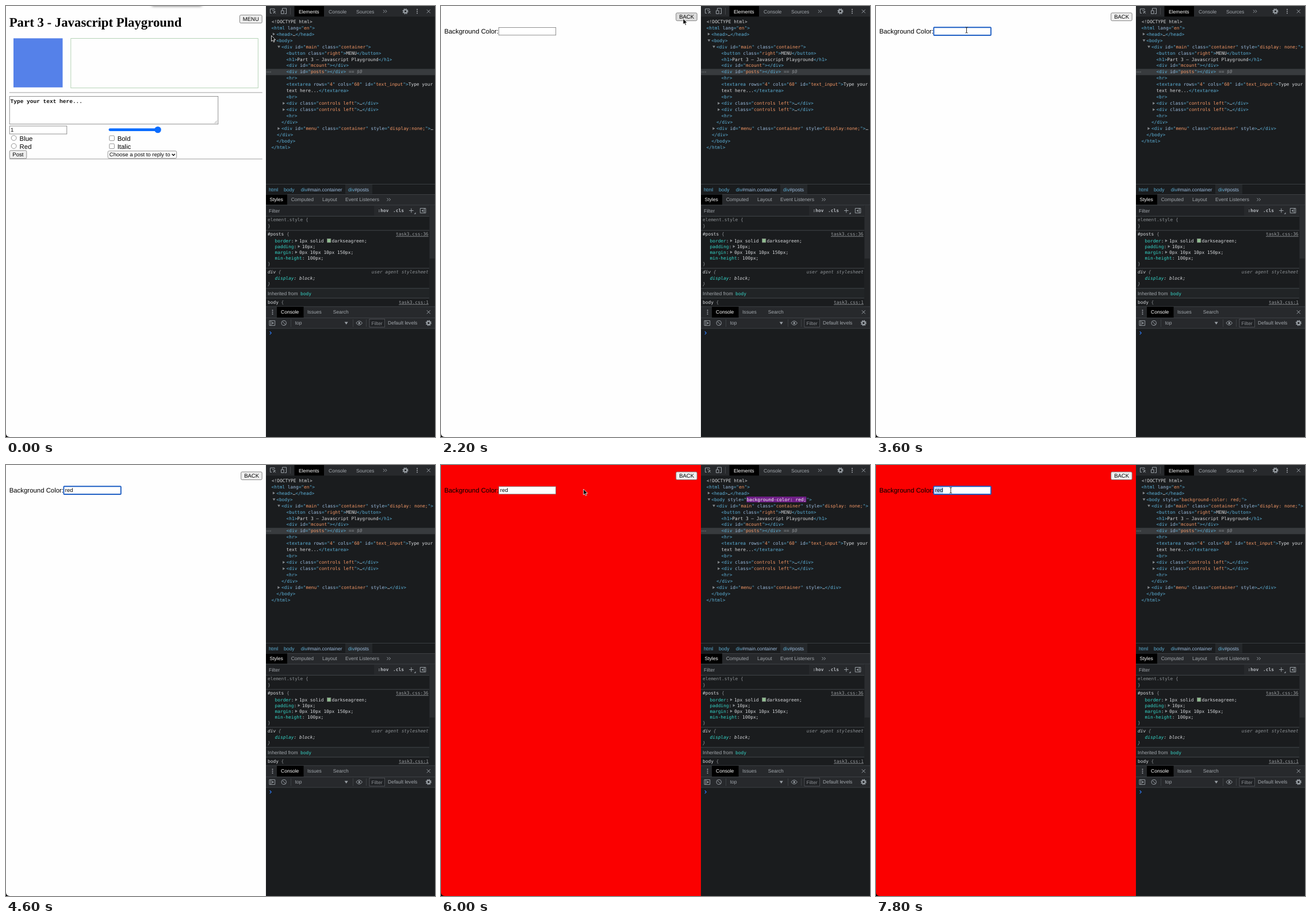
Write an HTML page that moves like this. It is 746 by 751 pixels and loops after 8 s.

```html
<!DOCTYPE html>
<html lang="en">
<head>
<meta charset="utf-8">
<style>
html, body { margin: 0; width: 100%; height: 100%; overflow: hidden; background: #fefefe; }
svg { display: block; }
text { text-rendering: geometricPrecision; white-space: pre; }
.page { font: 11.4px "Liberation Sans", Arial, sans-serif; fill: #000; }
.form { font: 9.5px "Liberation Sans", Arial, sans-serif; fill: #000; }
.title { font: bold 22.8px "Liberation Serif", Times, serif; }
.area { font: bold 9.5px "Liberation Mono", monospace; fill: #111; }
.ui { font: 8.55px "Liberation Sans", Arial, sans-serif; fill: #a2a7ac; }
.mono { font: 7.83px "DejaVu Sans Mono", monospace; fill: #d5d7da; }
.on { fill: #fff; }
.tag { fill: #5db0d7; }
.attr { fill: #9bbbdc; }
.val { fill: #f29766; }
.prop { fill: #35d4c7; }
.dim { fill: #8c9094; }
.it { font-style: italic; }
.bold { font-weight: bold; fill: #b6babf; }
.link { fill: #9a9da0; text-decoration: underline; }
.icon { fill: none; stroke: #9aa0a6; stroke-width: 1; }
</style>
</head>
<body>
<svg id="stage" width="746" height="751" viewBox="0 0 746 751"></svg>
<script>
const BG = '#1a1c1e', BAR = '#27292c', LINE = '#43464a', CHAR = 4.713;

const rect = (x, y, w, h, fill, extra = '') =>
  `<rect x="${x}" y="${y}" width="${w}" height="${h}" fill="${fill}" ${extra}/>`;
const text = (x, y, cls, body) => `<text x="${x}" y="${y}" class="${cls}">${body}</text>`;
const span = (cls, body) => `<tspan class="${cls}">${body}</tspan>`;
const path = (d, extra = 'class="icon"') => `<path d="${d}" ${extra}/>`;
const circle = (x, y, r, extra) => `<circle cx="${x}" cy="${y}" r="${r}" ${extra}/>`;
const group = (id, body) => `<g id="${id}">${body}</g>`;
const box = (x, y, w, h, fill = '#fff', r = 0) =>
  rect(x, y, w, h, fill, `stroke="#767676" stroke-width=".8" rx="${r}"`);
const rule = y => rect(452, y, 284, 1, LINE);
const strip = (y, h, fill) => rect(452, y, 294, h, fill);

// Colours markup the way the element inspector does.
const markup = line => line.split(/(<[^>]*>)/).map(part => {
  if (part[0] !== '<') return part;
  const inner = part.replace('<', '&lt;').replace(/( [\w-]+)(?:(=")([^"]*))?/g,
    (_, name, eq, value) => span('attr', name) + (eq ? eq + span('val', value) : ''));
  return span('tag', inner);
}).join('');

const rowY = n => 29.7 + n * 10.97;
const row = (n, x, line, after = '') => text(x, rowY(n), 'mono', markup(line) + after);
const arrow = (x, y, open) =>
  path(open ? `M${x - 2.4} ${y - 1.7}h4.8l-2.4 4z` : `M${x - 1.6} ${y - 2.4}v4.8l4-2.4z`, 'fill="#84888c"');
const rowArrow = (n, x, open) => arrow(x, rowY(n) - 2.7, open);
const flash = (id, n, x, chars, label) => group(id,
  rect(x, rowY(n) - 7.6, chars * CHAR, 10, '#6f1f87') + text(x, rowY(n), 'mono on', label));

const gear = (x, y) => circle(x, y, 2.8, 'fill="none" stroke="#9aa0a6" stroke-width="2"') +
  circle(x, y, 4.4, 'fill="none" stroke="#9aa0a6" stroke-width="1.4" stroke-dasharray="1.8 1.655"');
const cross = (x, y) => path(`M${x - 3} ${y - 3}l6 6m0 -6l-6 6`);
const dots = (x, y) => [-3.3, 0, 3.3].map(d => circle(x, y + d, 1, 'fill="#a4a8ad"')).join('');
const chevrons = (x, y) => path(`M${x - 3} ${y - 2.5}l2.5 2.5l-2.5 2.5m3.5 -5l2.5 2.5l-2.5 2.5`);

function mainPage() {
  return `<g filter="url(#blur)">${rect(254, -9, 86, 9, '#000', 'opacity=".6"')}</g>` +
    text(5.7, 35.6, 'title', 'Part 3 - Javascript Playground') +
    `<rect id="menuButton" x="406.4" y="15.8" width="38.8" height="13.9" rx="2" stroke="#767676" stroke-width=".9"/>` +
    text(411.8, 26, 'form', 'MENU') +
    rect(13, 56.3, 85.5, 85.5, '#5581e9') +
    rect(112.8, 56.6, 325.5, 86.2, 'none', 'stroke="#a3c9a5" stroke-width=".8"') +
    [150.5, 266].map(y => rect(5.7, y, 440, .8, '#858585') + rect(5.7, y + .8, 440, .5, '#dcdcdc')).join('') +
    box(6.2, 157.4, 362.6, 48.4) + text(7.6, 169, 'area', 'Type your text here...') +
    path('M362.5 204.2l4.5 -4.5m-2 4.5l2 -2', 'stroke="#777" stroke-width=".7"') +
    box(6.2, 209.1, 99.6, 13.9) + text(8, 219.4, 'form', '1') +
    rect(178.5, 213.3, 90, 4.6, '#0a6cff', 'rx="2.3"') + circle(264, 215.6, 5.7, 'fill="#0a6cff"') +
    [['Blue', 'Bold', 230], ['Red', 'Italic', 244]].map(([left, right, y]) =>
      circle(13.6, y, 4.4, 'fill="#fff" stroke="#767676" stroke-width=".8"') +
      text(23.6, y + 4.6, 'page', left) +
      box(179.8, y - 4, 8.6, 8.6, '#fff', 1.5) + text(193.7, y + 5, 'page', right)).join('') +
    box(6.2, 251.8, 29.6, 14, '#efefef', 2) + text(11.3, 262.2, 'form', 'Post') +
    box(177.2, 252.7, 119.4, 12.6, '#fff', 2) +
    text(179.8, 262.3, 'form', 'Choose a post to reply to') +
    path('M288.6 257.8l2.6 2.6l2.6 -2.6', 'fill="none" stroke="#000" stroke-width="1.4"');
}

function menuPage() {
  return `<rect id="backButton" x="408.7" y="12" width="36.5" height="13.7" rx="2" stroke="#767676" stroke-width=".9"/>` +
    text(414.2, 22.2, 'form', 'BACK') + text(5.7, 47.6, 'page', 'Background Color:') +
    box(100.5, 37.4, 99.2, 13.4) +
    rect(100.4, 37.3, 99.4, 13.7, 'none', 'id="focus" stroke="#1f5fc4" stroke-width="1.9" rx="1"') +
    rect(102.8, 39, 14, 10.4, '#b3d5fb', 'id="selection"') +
    `<text id="typed" x="102.8" y="47.2" class="form"></text>`;
}

function elementsPanel() {
  const tabs = [['Elements', 509, 'on'], ['Console', 561, ''], ['Sources', 609, '']];
  return strip(0, 751, BG) +
    strip(0, 18.5, BAR) + rect(501.5, 0, 51.5, 18.5, '#000') + rect(494, 3, 1, 12, LINE) +
    path('M467 7v-2h-7.5v7.5h2.5M463 7.5l5.5 2.2l-2.2 .8l2.6 2.7m-2.6 -2.7l-1.2 2.4z') +
    path('M480.5 8v-4h7v9.5h-3M478.5 8h4.5v5.5h-4.5z') +
    tabs.map(([label, x, cls]) => text(x, 12.6, 'ui ' + cls, label)).join('') +
    chevrons(659, 9.3) + gear(694.5, 9.3) + dots(715, 9.3) + cross(734.8, 9.3) +
    strip(rowY(8) - 7.9, 10.9, '#383b3e') +
    [454, 457, 460].map(x => circle(x, rowY(8) - 2.4, .7, 'fill="#8c9094"')).join('') +
    row(0, 462, '', '&lt;!DOCTYPE html&gt;') + row(1, 461.5, '<html lang="en">') +
    rowArrow(2, 465.5) + row(2, 470.2, '<head>…</head>') +
    rowArrow(3, 466, true) + rowArrow(4, 474.5, true) +
    row(5, 487.5, '<button class="right">MENU</button>') +
    row(6, 487.5, '<h1>Part 3 – Javascript Playground</h1>') +
    row(7, 487.5, '<div id="mcount"></div>') +
    row(8, 487.5, '<div id="posts"></div>', span('dim it', ' == $0')) +
    row(9, 487.5, '<hr>') +
    row(10, 487.5, '<textarea rows="4" cols="60" id="text_input">Type your') +
    row(11, 487.5, 'text here...</textarea>') + row(12, 487.5, '<br>') +
    [13, 14].map(n => rowArrow(n, 482.8) + row(n, 487.5, '<div class="controls left">…</div>')).join('') +
    row(15, 487.5, '<hr>') + row(16, 479, '</div>') + rowArrow(17, 474) +
    group('domBefore',
      row(4, 479, '<div id="main" class="container">') +
      row(17, 479, '<div id="menu" class="container" style="display:none;">…') +
      row(18, 471, '</div>') + row(19, 470.2, '</body>') + row(20, 461.5, '</html>')) +
    group('domAfter',
      row(4, 479, '<div id="main" class="container" style="display: none;">') +
      row(17, 479, '<div id="menu" class="container" style>…</div>') +
      row(18, 470.2, '</body>') + row(19, 461.5, '</html>')) +
    group('bodyPlain', row(3, 470.2, '<body>')) +
    group('bodyRed', row(3, 470.2, '<body style="background-color: red;">')) +
    group('menuFlash', flash('flashMain', 4, 479 + 40 * CHAR, 14, 'display: none;') +
      flash('flashMenu', 17, 479 + 33 * CHAR, 5, 'style')) +
    flash('bodyFlash', 3, 470.2 + 13 * CHAR, 22, 'background-color: red;');
}

function stylesPanel() {
  const crumb = (x, tag, rest = '') => text(x, 322.7, 'ui tag', tag + span('attr', rest));
  const decl = (y, name, value, expands) => {
    const after = 467.5 + (name.length + 1) * CHAR;
    return text(467.5, y, 'mono', span('prop', name) + ':') + (expands ? arrow(after + 4, y - 2.7) : '') +
      text(after + (expands ? 9.5 : CHAR), y, 'mono', value);
  };
  const tabs = [['Styles', 458.5, 'on'], ['Computed', 495.7, ''], ['Layout', 550, ''], ['Event Listeners', 590, '']];
  return strip(328, 38, BAR) + strip(310, .8, LINE) +
    rect(590, 311, 47, 16.5, '#25282b') + crumb(457, 'html') + crumb(483, 'body') +
    crumb(512.8, 'div', '#main.container') + crumb(595, 'div', '#posts') +
    strip(328, .8, LINE) + rect(452, 328.5, 37, 18, '#000') +
    tabs.map(([label, x, cls]) => text(x, 340.2, 'ui ' + cls, label)).join('') + chevrons(665.5, 337.3) +
    strip(346.5, .8, LINE) + rect(452, 348, 188, 17, '#202225') +
    text(457, 359.7, 'ui', 'Filter') + text(646.5, 359.2, 'mono bold', ':hov') + text(673, 359.2, 'mono bold', '.cls') +
    path('M701 356.5h7.6m-3.8 -3.8v7.6') + path('M712.5 359.5v3h-3z', 'fill="#9aa0a6"') +
    path('M720.3 352.5h9.5v8.2h-9.5zM727.3 352.5v8.2') + path('M725.5 354.5v4.4l-3 -2.2z', 'fill="#9aa0a6"') +
    strip(366, .8, LINE) +
    text(455, 375, 'mono dim', 'element.style {') + text(455, 386.3, 'mono dim', '}') + rule(390.5) +
    text(455, 400.3, 'mono', '#posts ' + span('dim', '{')) + text(678, 400.3, 'mono link', 'task3.css:36') +
    decl(411.7, 'border', '1px solid', true) + rect(558.3, 405.5, 6.6, 6.6, '#8fbc8f', 'stroke="#777" stroke-width=".6"') +
    text(566.5, 411.7, 'mono', 'darkseagreen;') + decl(421.7, 'padding', '10px;', true) +
    decl(431.7, 'margin', '0px 10px 10px 150px;', true) + decl(441.6, 'min-height', '100px;') +
    text(455, 451.8, 'mono dim', '}') + rule(456.5) +
    text(455, 465.8, 'mono it', 'div ' + span('dim', '{')) + text(635.8, 465.8, 'mono dim it', 'user agent stylesheet') +
    text(467.5, 477, 'mono it', span('prop', 'display') + ': block;') + text(455, 487, 'mono dim it', '}') +
    rect(452, 492, 284, 17, '#212426') + rule(491.5) + rule(508.5) +
    text(455, 503.7, 'ui', 'Inherited from') + text(512, 503.7, 'mono prop', 'body') +
    text(455, 518.8, 'mono', 'body ' + span('dim', '{')) + text(683, 518.8, 'mono link', 'task3.css:1') +
    rect(736, 347, 10, 176.5, '#1f2123') + rect(736.5, 347, 9, 93, '#2b2d30');
}

function consolePanel() {
  return strip(523.5, 38.5, BAR) + strip(523.5, .8, LINE) +
    rect(471, 524, 46.5, 19, '#000') + dots(463.5, 533.5) +
    text(478, 536.2, 'ui on', 'Console') + text(524, 536.2, 'ui', 'Issues') + text(568.7, 536.2, 'ui', 'Search') +
    cross(734.8, 533.3) + strip(543, .8, LINE) +
    path('M458 548.3h9.7v8.4h-9.7zM460.7 548.3v8.4') + path('M462.7 550.2v4.6l3.3 -2.3z', 'fill="#9aa0a6"') +
    circle(483.2, 552.4, 4.1, 'class="icon"') + path('M480.4 549.5l5.7 5.8') +
    rect(495, 546, .8, 13, LINE) + text(502.7, 555.4, 'ui', 'top') +
    path('M588.7 550.5h6l-3 4.6z', 'fill="#9aa0a6"') + rect(603, 546, .8, 13, LINE) +
    path('M608.8 552.4q5.4 -7 10.8 0q-5.4 7 -10.8 0z') + circle(614.2, 552.4, 1.7, 'fill="#9aa0a6"') +
    rect(626, 546, .8, 13, LINE) + rect(632, 545.5, 26.5, 14, '#202225', 'stroke="#55585c" stroke-width=".8"') +
    text(635.5, 555.8, 'ui dim', 'Filter') + text(664, 555.4, 'ui', 'Default levels') + gear(734.8, 552.4) +
    strip(561.5, .8, LINE) +
    path('M458.7 567.2l2.5 2.6l-2.5 2.6', 'fill="none" stroke="#2f7cf6" stroke-width="1.2"');
}

const stage = document.getElementById('stage');
stage.innerHTML =
  '<defs><filter id="blur" x="-20%" y="-100%" width="140%" height="300%"><feGaussianBlur stdDeviation="2.5"/></filter></defs>' +
  '<rect id="backdrop" width="452" height="751"/>' +
  group('mainPage', mainPage()) + group('menuPage', menuPage()) +
  path('M0 744.5q0 6.5 6.5 6.5h-6.5z', 'fill="#000"') +
  elementsPanel() + stylesPanel() + consolePanel() +
  group('pointer',
    path('M0 0v10l2.3 -2.1l1.5 3.5l1.7 -.7l-1.5 -3.4h3.1z', 'fill="#000" stroke="#fff" stroke-width=".8"')) +
  group('beam',
    path('M-2 -5q2 0 2 1.2q0 -1.2 2 -1.2M0 -4v8M-2 5q2 0 2 -1.2q0 1.2 2 1.2', 'fill="none" stroke="#222" stroke-width="1"'));

const el = id => document.getElementById(id);
const show = (id, visible) => { el(id).style.display = visible ? '' : 'none'; };

// time, x, y
const route = [[0, 461.5, 51.5], [1000, 422.3, 20.8], [1600, 421, 22], [2400, 421, 22], [3200, 157.5, 42],
  [5000, 157.5, 42], [5600, 247.7, 42], [6200, 247.7, 42], [7400, 130, 44], [8000, 130, 44]];

function pointerAt(t) {
  const i = route.findIndex((stop, n) => n && t <= stop[0]);
  const [t0, x0, y0] = route[i - 1], [t1, x1, y1] = route[i];
  const p = (t - t0) / (t1 - t0), e = p * p * (3 - 2 * p);
  return [x0 + (x1 - x0) * e, y0 + (y1 - y0) * e];
}

function render(t) {
  const onMenu = t >= 1600, red = t >= 6000;
  const [x, y] = pointerAt(t);
  const hidden = t >= 3800 && t < 5200, overField = onMenu && x < 200;
  const overButton = x > 406 && x < 445 && y < 30;
  const fade = start => t < start ? 0 : Math.max(0, 1 - (t - start) / 1200);

  el('backdrop').setAttribute('fill', red ? '#fb0000' : '#fefefe');
  show('mainPage', !onMenu);
  show('menuPage', onMenu);
  for (const id of ['menuButton', 'backButton'])
    el(id).setAttribute('fill', overButton ? '#dcdcdc' : '#efefef');
  show('focus', t >= 3400 && t < 6000 || t >= 7600);
  show('selection', t >= 7600);
  el('typed').textContent = 'red'.slice(0, [4200, 4400, 4600].filter(key => t >= key).length);

  show('domBefore', t < 2400);
  show('domAfter', t >= 2400);
  show('bodyPlain', !red);
  show('bodyRed', red);
  el('menuFlash').setAttribute('opacity', fade(2400));
  el('bodyFlash').setAttribute('opacity', fade(6000));

  show('pointer', !hidden && !overField);
  show('beam', !hidden && overField);
  for (const id of ['pointer', 'beam']) el(id).setAttribute('transform', `translate(${x} ${y})`);
}

const begin = performance.now();
function tick() {
  const t = (performance.now() - begin) % 8000;
  render(Math.floor(t / 200) * 200);
  requestAnimationFrame(tick);
}
tick();
</script>
</body>
</html>
```
